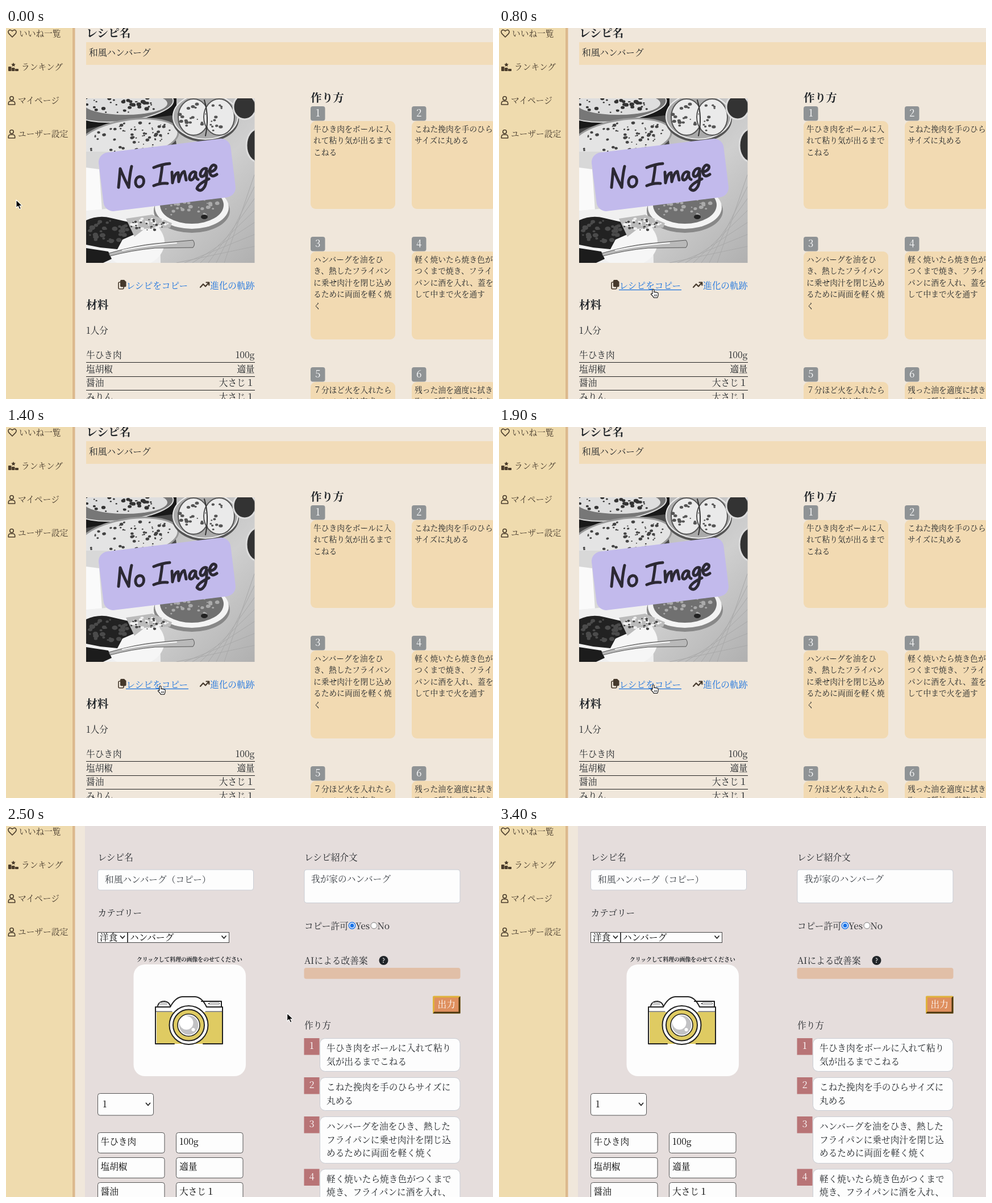
An HTML page for the animation above (3.5 s loop, 857 px wide and 654 px high).

```html
<!DOCTYPE html>
<html lang="ja">
<head>
<meta charset="utf-8">
<title>レシピ</title>
<style>
  html, body { margin: 0; width: 100%; height: 100%; overflow: hidden; background: #f0e7db; }
  svg { display: block; width: 857px; height: 654px; }
  text {
    font-family: "Noto Serif CJK JP", "Noto Serif JP", "Noto Serif", "Noto Sans CJK JP", "Noto Sans CJK", serif;
    white-space: pre;
  }
</style>
</head>
<body>
<svg id="stage" viewBox="0 0 857 654" xmlns="http://www.w3.org/2000/svg"></svg>
<script>
const INK = '#212529', BODY = 15.7, SMALL = 13.78, HEAD = 19.7;

const text = (x, y, str, size = BODY, fill = INK, extra = '') =>
  `<text x="${x}" y="${y}" font-size="${size}" fill="${fill}" ${extra}>${str}</text>`;
const bold = (x, y, str, size = HEAD) => text(x, y, str, size, INK, 'font-weight="700"');
const lines = (x, y, rows, pitch, size) => rows.map((r, i) => text(x, y + i * pitch, r, size)).join('');
const rect = (x, y, w, h, fill, r = 0, extra = '') =>
  `<rect x="${x}" y="${y}" width="${w}" height="${h}" rx="${r}" fill="${fill}" ${extra}/>`;
const ellipse = (x, y, rx, ry, fill, extra = '') =>
  `<ellipse cx="${x}" cy="${y}" rx="${rx}" ry="${ry}" fill="${fill}" ${extra}/>`;
const circle = (x, y, r, fill, extra) => ellipse(x, y, r, r, fill, extra);
const path = (d, fill, extra = '') => `<path d="${d}" fill="${fill}" ${extra}/>`;
const stroke = (color, width) => `stroke="${color}" stroke-width="${width}"`;
const line = (d, color, width) =>
  path(d, 'none', stroke(color, width) + ' stroke-linecap="round" stroke-linejoin="round"');
const field = (x, y, w, h, border = '#555', r = 4) =>
  rect(x + .5, y + .5, w - 1, h - 1, '#fdfdfd', r, stroke(border, 1));
const chevron = (x, y) => line(`M${x - 3.5} ${y - 2}l3.5 4 3.5 -4`, '#222', 1.8);

function seeded(seed) {
  return () => (seed = (seed * 16807) % 2147483647) / 2147483647;
}

function specks(x, y, rx, ry, count, color, size, seed, tilt = 0) {
  const rnd = seeded(seed);
  let out = '';
  for (let i = 0; i < count; i++) {
    const a = rnd() * 6.283, d = Math.sqrt(rnd()), s = size * (.4 + rnd());
    out += ellipse((x + Math.cos(a) * d * rx).toFixed(1), (y + Math.sin(a) * d * ry).toFixed(1),
      (s * 1.3).toFixed(1), s.toFixed(1), color);
  }
  return `<g transform="rotate(${tilt} ${x} ${y})">${out}</g>`;
}

function sidebar() {
  const color = '#4b3d2c';
  const user = y => circle(10, y - 4, 3.2, 'none', stroke(color, 1.6)) +
    path(`M4.3 ${y + 7}v-2q0-4 4-4h3.400q4 0 4 4v2z`, 'none', stroke(color, 1.6) + ' stroke-linejoin="round"');
  const labels = [[23, 'いいね一覧'], [27, 'ランキング'], [21, 'マイページ'], [21, 'ユーザー設定']];
  return rect(0, 0, 117, 654, '#efdbae') + rect(117, 0, 4.5, 654, '#dcb98d') +
    path('M11 16l-5.500-5.600C1 5.500 7 .5 11 5.500c4-5 10 0 5.500 4.900z', 'none',
      stroke(color, 1.6) + ' stroke-linejoin="round"') +
    rect(4, 68, 5.5, 8, color, 1) + rect(10, 70, 5.5, 6, color, 1) + rect(16, 72, 6, 4, color, 1) +
    path('M13 61l1.200 2.300 2.600.4-1.900 1.800.5 2.500-2.400-1.200-2.400 1.200.5-2.500-1.900-1.800 2.600-.4z', color) +
    user(128) + user(187) +
    labels.map(([x, s], i) => text(x, 14.5 + i * 59.3, s, 14.7, '#45392c')).join('');
}

function photo() {
  const ink = '#2c2934';
  const handwriting =
    'M198 281Q200 262 201 248Q208 266 216 281Q217 262 221 244' +
    'M235 262c-10 2-9 19 0 18c10-2 10-19 0-18' +
    'M260 246Q275 240 288 239M275 242Q273 262 270 275M260 278Q272 273 284 274' +
    'M292 254L293 273Q297 255 303 255L304 271Q309 252 314 253L317 268' +
    'M333 254c-9-3-14 14-7 14q5-1 8-13q-1 10 4 12' +
    'M353 248c-9-3-15 13-8 14q6-1 8-12q1 20-3 29q-7 12-14 4q2-8 21-17' +
    'M359 254Q372 250 369 243Q362 238 358 252Q360 266 371 258';
  let grain = '';
  for (let i = 0; i < 7; i++) grain += `M${300 + i * 14} 414L437 ${385 - i * 21}`;
  return `<g clip-path="url(#photoClip)">` +
    rect(141, 124, 297, 290, 'url(#table)') + line(grain, '#a9a9a9', 1) +
    path('M141 124H300V160L205 172L141 190z', '#191919') +
    ellipse(208, 138, 87, 26, '#777', 'transform="rotate(-7 208 138)" ' + stroke('#ddd', 2)) +
    ellipse(210, 133, 74, 20, '#dedede') + specks(210, 132, 70, 19, 44, '#333', 2.4, 17) +
    path('M141 178L210 164L292 154L300 205L230 240H141z', '#4a4a4a') +
    ellipse(216, 196, 88, 34, '#e4e4e4', 'transform="rotate(-9 216 196)" ' + stroke('#999', 3)) +
    specks(216, 195, 78, 28, 70, '#444', 1.9, 41, -9) +
    ellipse(351, 160, 59, 41, '#555') + ellipse(351, 156, 57, 40, '#aaa', stroke('#eee', 2)) +
    ellipse(330, 157, 27, 32, '#eaeaea', stroke('#555', 2)) +
    ellipse(375, 157, 27, 32, '#eaeaea', stroke('#555', 2)) +
    specks(350, 157, 45, 27, 30, '#555', 2, 9) + line('M349 127Q358 157 351 190', '#333', 2) +
    ellipse(420, 139, 20, 22, '#333', stroke('#ddd', 3)) + ellipse(443, 207, 20, 29, '#333', stroke('#ddd', 3)) +
    path('M141 218H182L190 320L141 330z', '#d8d8d8') + path('M141 246L164 249L169 322L141 330z', '#fafafa') +
    path('M141 322L270 310L272 414H141z', '#f0f0f0') + ellipse(225, 378, 54, 43, '#f6f6f6') +
    ellipse(327, 322, 67, 39, '#888') + ellipse(327, 316, 65, 38, '#f3f3f3') +
    ellipse(327, 312, 56, 33, '#707070') + specks(327, 316, 49, 24, 45, '#aaa', 2.2, 33) +
    ellipse(349, 333, 6, 4, '#222') +
    path('M141 339Q163 329 185 335L224 344L230 362L205 373L196 390L166 387L141 382z', '#222') +
    specks(181, 358, 36, 20, 35, '#4b4b4b', 3, 71) +
    path('M211 336L257 329L292 344L289 352L244 354L226 368z', '#bbb') +
    specks(250, 345, 35, 10, 34, '#f1f1f1', 1.8, 15) + specks(247, 347, 33, 10, 24, '#444', 1.5, 25) +
    path('M141 388L180 394L186 407L171 414H141z', '#1c1c1c') +
    path('M181 397Q230 383 263 380L329 374Q334 381 329 387L262 388Q220 392 183 402z', '#b9b9b9', stroke('#555', 1)) +
    line('M205 392Q240 384 300 379', '#f8f8f8', 2) +
    `</g>` +
    rect(166.5, 207, 234, 104, '#c2baec', 17, 'transform="rotate(-7 283.5 259)"') +
    line(handwriting, ink, 5);
}

function step(n, x, y, rows) {
  return rect(x, y, 25.5, 25.5, '#8f9395', 4) +
    text(x + 12.7, y + 18, n, 17, '#fff', 'text-anchor="middle"') +
    rect(x, y + 26, 149, 155, '#f2dab2', 9) + lines(x + 5, y + 44.5, rows, 20.65, SMALL);
}

function recipePage() {
  const steps = [
    ['牛ひき肉をボールに入', 'れて粘り気が出るまで', 'こねる'],
    ['こねた挽肉を手のひら', 'サイズに丸める'],
    ['ハンバーグを油をひ', 'き、熱したフライパン', 'に乗せ肉汁を閉じ込め', 'るために両面を軽く焼', 'く'],
    ['軽く焼いたら焼き色が', 'つくまで焼き、フライ', 'パンに酒を入れ、蓋を', 'して中まで火を通す'],
    ['７分ほど火を入れたら', 'ハンバーグは完成'],
    ['残った油を適度に拭き', '取って醤油、砂糖みり']
  ];
  const items = [['牛ひき肉', '100g'], ['塩胡椒', '適量'], ['醤油', '大さじ１'], ['みりん', '大さじ１']];
  const link = '#1670de', icon = '#45392c';
  return bold(141, 16, 'レシピ名') + rect(141, 25, 716, 40, '#f2dcb9') +
    text(146, 49, '和風ハンバーグ') + photo() +
    rect(198, 448, 9, 12, 'none', 2, stroke(icon, 1.6)) +
    path('M203 444h5l3.500 3.500v7q0 2-2 2h-6.500q-2 0-2-2v-8.500q0-2 2-2z', icon) +
    text(211.5, 460, 'レシピをコピー', BODY, link) +
    `<g id="underline">${rect(211, 461, 110, 1.2, link)}</g>` +
    line('M342 457l5-5.500 4 4 6-6.500M352.500 448.500h4.800v4.800', icon, 2.2) +
    text(359, 460, '進化の軌跡', BODY, link) +
    bold(141, 494.5, '材料') + text(141, 539, '1人分') +
    items.map(([name, amount], i) => {
      const y = 582 + i * 24.7;
      return text(141, y, name) + text(437.5, y, amount, BODY, INK, 'text-anchor="end"') +
        rect(141, Math.round(y + 7), 297, 1, '#222');
    }).join('') +
    bold(536, 130, '作り方') +
    steps.map((rows, i) => step(i + 1, 536 + i % 2 * 178, 138 + (i >> 1) * 230, rows)).join('');
}

function camera() {
  const k = '#222', y = '#dfcb62';
  return rect(265, 328, 115, 56, y) + rect(265, 318, 115, 10, '#fff') +
    line('M263 384V319H289Q298 302 310 301H333Q345 302 353 319H381V384H347M263 384H296', k, 2) +
    line('M267 317Q269 309 279 309Q287 310 289 317M344 309H379V318M357 313H375', k, 2) +
    line('M263 327H292M351 327H381', k, 1.2) +
    rect(270, 311, 14, 5, '#ccc', 2) + rect(358, 310, 17, 6, '#ccc') +
    circle(321.5, 351, 34, '#fff', stroke(k, 2)) + circle(321.5, 351, 27.5, y, stroke(k, 2)) +
    circle(321.5, 351, 19.5, '#fff', stroke(k, 1.6)) + circle(321.5, 351, 17, '#c2c2c4') +
    circle(317.5, 347, 12, '#fff') + circle(329.500, 359, 3, '#fff');
}

function formPage() {
  const steps = [
    [374, 59, ['牛ひき肉をボールに入れて粘り', '気が出るまでこねる']],
    [443, 59, ['こねた挽肉を手のひらサイズに', '丸める']],
    [512, 83, ['ハンバーグを油をひき、熱した', 'フライパンに乗せ肉汁を閉じ込', 'めるために両面を軽く焼く']],
    [604.5, 83, ['軽く焼いたら焼き色がつくまで', '焼き、フライパンに酒を入れ、']]
  ];
  const items = [['牛ひき肉', '100g'], ['塩胡椒', '適量'], ['醤油', '大さじ１']];
  const pale = '#c9cdd4', soft = '#3c4147';
  return rect(139, 0, 718, 654, '#e5dddc') +
    text(161.5, 61, 'レシピ名') + field(161, 76.5, 275, 37, pale) +
    text(174, 100, '和風ハンバーグ（コピー）', BODY, soft) +
    text(161.5, 159, 'カテゴリー') +
    field(161, 187, 53, 19, '#444', 0) + text(165, 201.5, '洋食', BODY, '#000') + chevron(205, 196) +
    field(214, 187, 179, 19, '#444', 0) + text(218, 201.5, 'ハンバーグ', BODY, '#000') + chevron(383.5, 196) +
    bold(230, 238.5, 'クリックして料理の画像をのせてください', 9.8) +
    rect(224.5, 244, 197.5, 197, '#fdfdfd', 20) + camera() +
    field(161, 471, 99, 39.500) + text(170, 496, '1', BODY, '#000') + chevron(250, 490.5) +
    items.map((pair, i) => pair.map((s, j) =>
      field(161 + j * 138, 540 + i * 44, 118.5, 37) +
      text(166.500 + j * 138.5, 562 + i * 44, s, BODY, '#000')).join('')).join('') +
    text(525, 61, 'レシピ紹介文') + field(524.5, 76.5, 275, 59.500, pale) +
    text(537, 99, '我が家のハンバーグ', BODY, soft) +
    text(525, 181.5, 'コピー許可') +
    circle(609, 175.5, 5.7, '#fff', stroke('#1a73e8', 1.5)) + circle(609, 175.5, 3.5, '#1a73e8') +
    text(615, 181.5, 'Yes') + circle(647.5, 175.5, 5.5, '#fff', stroke('#777', 1)) + text(653.5, 181.5, 'No') +
    text(525, 242.5, 'AIによる改善案') + circle(664.5, 237, 8, '#212529') +
    text(664.5, 241, '?', 11, '#fff', 'text-anchor="middle" font-weight="700"') +
    rect(524.5, 250, 275, 19.500, '#e1bfa7', 4) +
    rect(751, 299.5, 48.5, 31, '#dfb23c', 2) + path('M799.500 300V330.500H751L754 327H796V303z', '#4b3810') +
    rect(754, 302.5, 42.5, 25, '#df905f') + text(759.5, 319.5, '出力', BODY, '#fff') +
    text(525, 357, '作り方') +
    steps.map(([y, h, rows], i) =>
      rect(524.5, y, 27, 29.5, '#b87476') +
      text(538, y + 19, i + 1, 16.5, '#fff', 'text-anchor="middle"') +
      field(552, y, 247.5, h, pale, 9) + lines(564, y + 23.2, rows, 23.4)).join('');
}

function pointers() {
  const outline = stroke('#fff', 1.1) + ' stroke-linejoin="round"';
  const hand = 'M1 1.500Q2.500-.5 4 1.500V6Q5.500 4.500 6.500 6.200Q8 5 9 6.800Q11 6 11.200 8V11' +
    'Q11 13 9.500 15.500H3.500Q2.500 13-1.500 9.500Q-1.500 7.500 1 8.500z';
  return `<g id="arrow">${path('M0 0V14L3.300 11L5.700 16.500L8.200 15.400L5.900 10.200H10.300z', '#000', outline)}</g>` +
    `<g id="hand">${path(hand, '#fff', stroke('#111', 1.1) + ' stroke-linejoin="round"')}` +
    `${line('M4.500 10V13M6.500 10V13M8.500 10V13', '#111', .8)}</g>`;
}

const stage = document.getElementById('stage');
stage.innerHTML =
  `<defs><clipPath id="photoClip">${rect(141, 124, 296.5, 290, '#000')}</clipPath>` +
  `<linearGradient id="table" x1="0" y1="0" x2="1" y2="1">` +
  `<stop stop-color="#aaa"/><stop offset=".6" stop-color="#cfcfcf"/><stop offset="1" stop-color="#b0b0b0"/>` +
  `</linearGradient></defs>` +
  rect(0, 0, 857, 654, '#f0e7db') + sidebar() +
  `<g id="recipe">${recipePage()}</g><g id="form">${formPage()}</g>` + pointers();

const LOOP = 3500, TICK = 100, HOVER = 700, SWITCH = 2000, LEAVE = 2100, GONE = 2800;
const track = [
  [0, 18, 303], [100, 30, 311], [400, 188, 403], [700, 269, 460], [1000, 269, 460],
  [1600, 269, 454], [2100, 269, 454], [2800, 664, 237], [LOOP, 664, 237]
];
const part = Object.fromEntries(['recipe', 'form', 'underline', 'arrow', 'hand']
  .map(id => [id, document.getElementById(id)]));
const show = (el, on) => el.setAttribute('visibility', on ? 'visible' : 'hidden');

function pointerAt(t) {
  const i = track.findIndex(k => k[0] > t);
  const [t0, x0, y0] = track[i - 1], [t1, x1, y1] = track[i];
  const p = (t - t0) / (t1 - t0);
  return [x0 + (x1 - x0) * p, y0 + (y1 - y0) * p];
}

function render(time) {
  const t = Math.floor(time % LOOP / TICK) * TICK;
  const onLink = t >= HOVER && t < LEAVE;
  const [x, y] = pointerAt(t);
  show(part.recipe, t < SWITCH);
  show(part.form, t >= SWITCH);
  show(part.underline, t >= HOVER && t < SWITCH);
  show(part.hand, onLink);
  show(part.arrow, !onLink && t < GONE);
  for (const el of [part.arrow, part.hand]) el.setAttribute('transform', `translate(${x} ${y})`);
}

const start = performance.now();
function frame() {
  render(performance.now() - start);
  requestAnimationFrame(frame);
}
frame();
</script>
</body>
</html>
```
